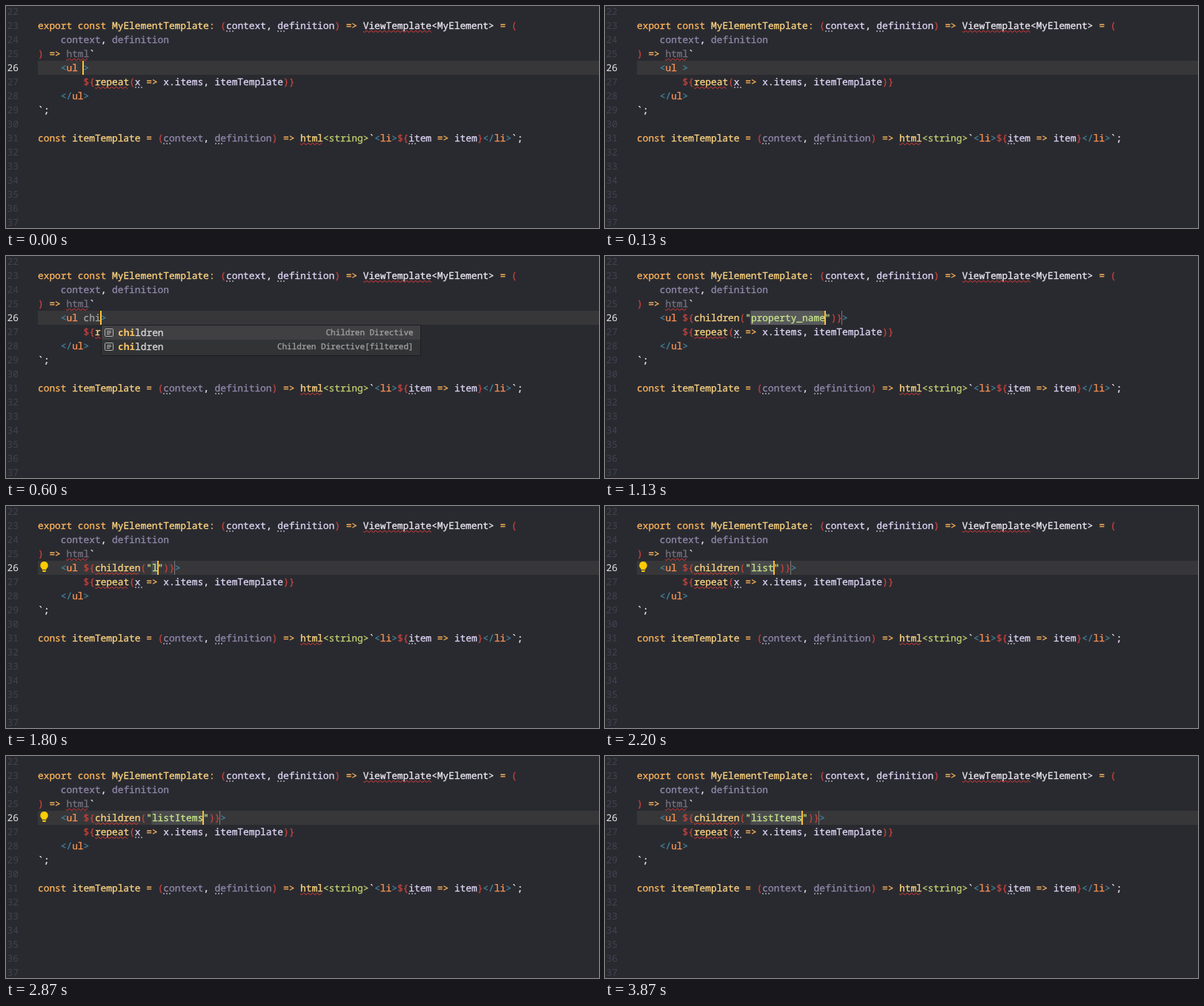
Write an HTML page that moves like this. It is 800 px wide and 300 px high and loops after 4200 ms.

```html
<!DOCTYPE html>
<html lang="en">
<head>
<meta charset="utf-8">
<title>Editor snippet completion</title>
<style>
  html, body { margin: 0; width: 100%; height: 100%; overflow: hidden; background: #292a30; }
  svg { display: block; width: 800px; height: 300px; }
  text {
    font: 12.828px "Noto Sans Mono", "DejaVu Sans Mono", monospace;
    white-space: pre;
    text-rendering: geometricPrecision;
    fill: currentColor;
    stroke: currentColor;
    stroke-width: .3px;
  }
  .num { color: #40424f; stroke: none; }
  .num.on { color: #e4e4e8; }
  .key { color: #ffb65c; }
  .fn { color: #ffd580; }
  .br { color: #c5423c; }
  .id { color: #dfd6f6; }
  .dim { color: #9289ab; }
  .off { color: #75707f; }
  .typ { color: #ece7f2; }
  .str { color: #c8e68a; }
  .gen { color: #c3d070; }
  .pun { color: #45849a; }
  .tag { color: #ff9453; }
  .att { color: #a6a6a8; }
  .lab { color: #dadada; }
  .hit { color: #ffc766; font-weight: 700; stroke: none; }
  .info { color: #a2a2a4; font-size: 10.93px; }
</style>
</head>
<body>
<svg id="stage" viewBox="0 0 800 300">
  <defs>
    <g id="icon" fill="none" stroke="#b4b4b6">
      <rect x=".5" y=".5" width="11" height="10" rx="1"/>
      <path d="M3 3.5h6M3 5.5h6M3 7.5h4"/>
    </g>
  </defs>
</svg>
<script>
const LOOP = 4200, CHAR = 7.697, LEFT = 42.4, ROW = 19, INSET = .6;
const stage = document.getElementById('stage');
const timed = [];

const colX = col => LEFT + col * CHAR;
const rowY = row => 74 + (row - 26) * ROW;

function add(parent, tag, attrs, content) {
  const el = document.createElementNS('http://www.w3.org/2000/svg', tag);
  for (const name in attrs) el.setAttribute(name, attrs[name]);
  if (content) el.textContent = content;
  parent.appendChild(el);
  return el;
}

const rect = (parent, x, y, width, height, fill) =>
  add(parent, 'rect', { x, y, width, height, fill });

// A group that is visible from one time to another
function during(from, to) {
  const el = add(stage, 'g', {});
  timed.push({ el, from, to });
  return el;
}

// Tokens alternate between class and text
function code(parent, row, col, ...tokens) {
  for (let i = 0; i < tokens.length; i += 2) {
    add(parent, 'text', { x: colX(col) + INSET, y: rowY(row) + 14, class: tokens[i] }, tokens[i + 1]);
    col += tokens[i + 1].length;
  }
}

function squiggle(parent, row, col, length) {
  const start = Math.round(colX(col) + INSET), end = colX(col + length) + INSET;
  const y = rowY(row) + 16;
  let d = `M${start} ${y + 1.3}l1.7 1.3`;
  for (let x = start + 1.7, up = true; x + 3 <= end; x += 3, up = !up) {
    d += `l3 ${up ? -2.4 : 2.4}`;
  }
  add(parent, 'path', { d, fill: 'none', stroke: '#e23c38', 'stroke-width': 1 });
}

function dots(row, col) {
  for (const dx of [1, 5, 9]) {
    add(stage, 'circle', { cx: Math.round(colX(col) + INSET) + dx, cy: rowY(row) + 17, r: 1, fill: '#a9a6b4' });
  }
}

function cursor(col, from, to) {
  rect(during(from, to), Math.floor(colX(col)), 74, 2, ROW, '#ffc02e');
}

function popup(left, from, to, typed, items) {
  const g = during(from, to);
  const height = items.length * ROW + 4;
  rect(g, left, 93, 432, height, '#1d1e22');
  rect(g, left + 1, 94, 430, height - 2, '#313335');
  rect(g, left + 1, 94, 430, ROW, '#404043');
  items.forEach(([label, info], i) => {
    const y = 108 + i * ROW, at = label.indexOf(typed), end = at + typed.length;
    add(g, 'use', { href: '#icon', x: left + 5, y: y - 10 });
    const put = (pos, text, cls) => text &&
      add(g, 'text', { x: left + 23 + pos * CHAR, y, class: cls }, text);
    put(0, label.slice(0, at), 'lab');
    put(at, typed, 'hit');
    put(end, label.slice(end), 'lab');
    add(g, 'text', { x: left + 421.5, y: y - 1, class: 'info', 'text-anchor': 'end' }, info);
  });
}

// Static editor
rect(stage, 0, 0, 800, 300, '#292a30');
for (let n = 22; n <= 37; n++) {
  add(stage, 'text', { x: 1.6, y: rowY(n) + 14, class: n === 26 ? 'num on' : 'num' }, String(n));
}

// The current line is not lit while text is selected
[[0, 1130], [1800, LOOP]].forEach(([from, to]) => {
  rect(during(from, to), 43, 74, 757, ROW, '#37373a');
});

code(stage, 23, 0, 'key', 'export const ', 'fn', 'MyElementTemplate', 'key', ': ', 'br', '(',
  'id', 'context', 'typ', ', ', 'id', 'definition', 'br', ')', 'key', ' => ',
  'typ', 'ViewTemplate<MyElement>', 'key', ' = ', 'br', '(');
code(stage, 24, 4, 'dim', 'context', 'typ', ', ', 'dim', 'definition');
code(stage, 25, 0, 'br', ')', 'key', ' => ', 'off', 'html', 'typ', '`');
code(stage, 27, 8, 'br', '${', 'fn', 'repeat', 'br', '(', 'id', 'x', 'key', ' => ',
  'id', 'x', 'typ', '.', 'id', 'items', 'typ', ', ', 'id', 'itemTemplate', 'br', ')}');
code(stage, 28, 4, 'pun', '</', 'tag', 'ul', 'pun', '>');
code(stage, 29, 0, 'typ', '`;');
code(stage, 31, 0, 'key', 'const ', 'fn', 'itemTemplate', 'key', ' = ', 'br', '(',
  'dim', 'context', 'typ', ', ', 'dim', 'definition', 'br', ')', 'key', ' => ',
  'fn', 'html', 'gen', '<string>', 'typ', '`', 'pun', '<', 'tag', 'li', 'pun', '>',
  'br', '${', 'id', 'item', 'key', ' => ', 'id', 'item', 'br', '}',
  'pun', '</', 'tag', 'li', 'pun', '>', 'typ', '`;');

squiggle(stage, 23, 57, 12);
squiggle(stage, 25, 5, 4);
squiggle(stage, 27, 10, 6);
squiggle(stage, 31, 46, 4);
[[23, 33], [23, 42], [27, 17], [31, 22], [31, 31], [31, 65]].forEach(p => dots(...p));

// Row 26: attribute being typed
[['', 0, 460], ['c', 460, 530], ['ch', 530, 600], ['chi', 600, 1130]].forEach(([word, from, to]) => {
  code(during(from, to), 26, 4, 'pun', '<', 'tag', 'ul ', 'att', word, 'pun', '>');
});

// Row 26: inserted snippet, its placeholder replaced letter by letter
[['property_name', 1130, 1800], ['l', 1800, 2000], ['li', 2000, 2200], ['list', 2200, 2460],
 ['listI', 2460, 2530], ['listIt', 2530, 2600], ['listIte', 2600, 2800],
 ['listItem', 2800, 2870], ['listItems', 2870, LOOP]].forEach(([word, from, to]) => {
  const g = during(from, to), end = 20 + word.length;
  const selected = from === 1130;
  rect(g, colX(20), 74, word.length * CHAR, ROW, selected ? '#58595b' : '#4a4b4d');
  rect(g, Math.floor(colX(end + 3)), 74, 1, ROW, '#77777b');
  code(g, 26, 4, 'pun', '<', 'tag', 'ul ', 'br', '${', 'fn', 'children', 'br', '(',
    'str', `"${word}"`, 'br', ')}', 'pun', '>');
  if (!selected) cursor(end, from, from === 2870 ? 3410 : to);
});
squiggle(during(1530, LOOP), 26, 10, 8);

cursor(8, 0, 130);
cursor(9, 460, 530);
cursor(10, 530, 600);
cursor(11, 600, 1130);
cursor(33, 1130, 1600);
cursor(29, 3870, LOOP);

// Light bulb
add(during(1330, 3140), 'path', {
  d: 'M51.5 75a5.3 5.3 0 0 1 3 9.6V86h-6v-1.4a5.3 5.3 0 0 1 3-9.6zM49 87h5v1l-1 1h-3l-1-1z',
  fill: '#ffcc00'
});

// Completion list
const pair = [['children', 'Children Directive'], ['children', 'Children Directive[filtered]']];
popup(112, 460, 530, 'c', [
  ...pair,
  ['class', 'Class Definition'],
  ['ctor', 'Constructor'],
  ['export class', 'Custom Element[decorated]'],
  ['export class', 'Foundation Element'],
  ['export const', 'ZELM Template[typed]'],
  ['export const', 'ZELM Template[untyped]'],
  ['export const', 'ZELM Styles']
]);
popup(120, 530, 600, 'ch', pair);
popup(128, 600, 1130, 'chi', pair);

const start = performance.now();
function draw() {
  const t = (performance.now() - start) % LOOP;
  for (const { el, from, to } of timed) {
    el.style.visibility = t >= from && t < to ? 'visible' : 'hidden';
  }
  requestAnimationFrame(draw);
}
draw();
</script>
</body>
</html>
```
